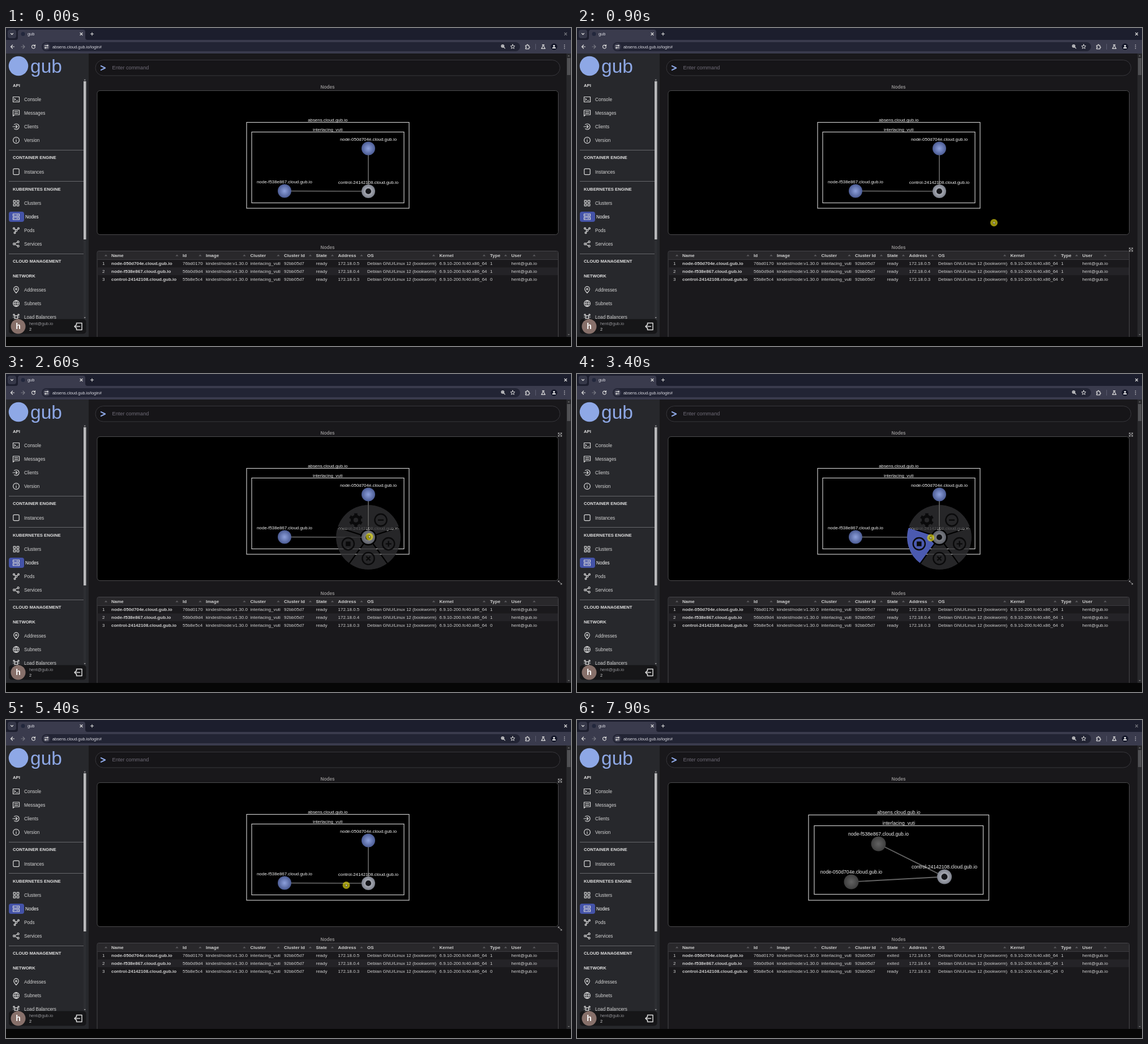
Recreate the animation shown at these times as an HTML page. Size 998 px wide and 561 px high, loop 8000 ms.

```html
<!DOCTYPE html>
<html lang="en">
<head>
<meta charset="utf-8">
<title>Nodes</title>
<style>
  html, body { margin: 0; width: 100%; height: 100%; overflow: hidden; background: #0b0b0b; }
  svg { display: block; width: 998px; height: 561px; font-family: "Liberation Sans", Arial, sans-serif; }
  .line { fill: none; stroke: #dadada; stroke-width: 1.2; stroke-linecap: round; stroke-linejoin: round; }
</style>
</head>
<body>
<svg id="stage" viewBox="0 0 998 561">
  <defs>
    <radialGradient id="ready"><stop offset="0" stop-color="#8da0dc"/><stop offset="1" stop-color="#4c5c94"/></radialGradient>
    <radialGradient id="control"><stop offset="0" stop-color="#c6c8d0"/><stop offset="1" stop-color="#7c808b"/></radialGradient>
    <radialGradient id="exited"><stop offset="0" stop-color="#626262"/><stop offset="1" stop-color="#3e3e3e"/></radialGradient>
    <mask id="cutout" maskUnits="userSpaceOnUse" x="-60" y="-60" width="120" height="120">
      <circle r="57.3" fill="#fff"/>
      <g id="spokes" stroke="#000" stroke-width="2.2"></g>
      <circle r="14.5"/>
      <rect id="pointer" x="-6" y="-6" width="12" height="12"/>
    </mask>
  </defs>
  <g id="browser"></g>
  <g id="sidebar"></g>
  <g id="page"></g>
  <g id="graph"></g>
  <g id="menu" transform="translate(640 288)"></g>
  <g id="hints" class="line"></g>
  <g id="cursor">
    <circle r="6.5" fill="#e8de10" opacity=".66"/>
    <path d="M-1-2.2V2L0 1.1 1 2.8 1.7 2.4.9.8 2 .6Z" fill="#fff" stroke="#222" stroke-width=".5"/>
  </g>
</svg>
<script>
const LOOP = 8000;
const HOST = 'absens.cloud.gub.io';
const USER = 'hent@gub.io';
const CLUSTER = 'interlacing_vuti';
const nodeName = id => `${id}.cloud.gub.io`;
const WORKER_A = nodeName('node-050d704e');
const WORKER_B = nodeName('node-f538e867');
const CONTROL = nodeName('control-24142108');

const $ = id => document.getElementById(id);
const text = (x, y, s, fill = '#d0d0d0', size = 8, extra = '') =>
  `<text x="${x}" y="${y}" fill="${fill}" font-size="${size}" ${extra}>${s}</text>`;
const rect = (x, y, w, h, fill, r = 0, extra = '') =>
  `<rect x="${x}" y="${y}" width="${w}" height="${h}" rx="${r}" fill="${fill}" ${extra}/>`;
const circle = (x, y, r, fill, extra = '') =>
  `<circle cx="${x}" cy="${y}" r="${r}" fill="${fill}" ${extra}/>`;
const icon = (x, y, d, extra = '') =>
  `<path class="line" transform="translate(${x} ${y})" d="${d}" ${extra}/>`;
const ring = (x, y, r) => `M${x - r} ${y}a${r} ${r} 0 1 0 ${2 * r} 0a${r} ${r} 0 1 0 ${-2 * r} 0`;
const box = (x, y, w, h = w) => `M${x} ${y}h${w}v${h}h${-w}z`;
const BOLD = 'font-weight="700"';
const MIDDLE = 'text-anchor="middle"';

const CROSS = 'M-2-2 2 2M2-2-2 2';
const UP = 'M-2.6 1.4H2.6L0-1.6Z';

function drawBrowser() {
  const star = Array.from({ length: 10 }, (_, i) => {
    const r = i % 2 ? 1.8 : 4, a = (i * 36 - 90) * Math.PI / 180;
    return `${(r * Math.cos(a)).toFixed(2)} ${(r * Math.sin(a)).toFixed(2)}`;
  }).join('L');
  $('browser').innerHTML =
    rect(0, 0, 998, 45, '#1c1e2d') +
    rect(3, 3, 15, 15, '#363849', 4) + icon(10.5, 10.5, 'M-2-1 0 1 2-1') +
    `<path d="M17 21q4 0 4-4V7q0-4 4-4H136q4 0 4 4V17q0 4 4 4Z" fill="#3a3b4d"/>` +
    rect(0, 21, 998, 24, '#3a3b4d') +
    circle(30, 10.5, 3.5, '#22273c') + text(38, 13.3, 'gub', '#e3e3ea', 7.4) +
    icon(133, 10.5, CROSS) + icon(152, 10.5, 'M-2.5 0H2.5M0-2.5V2.5') +
    rect(63, 25, 845, 16, '#222434', 8) + circle(71.5, 33, 6.2, '#3a3b4d') +
    icon(11.5, 33, 'M3 0H-3M0-3-3 0 0 3') +
    icon(30, 33, 'M-3 0H3M0-3 3 0 0 3', 'opacity=".4"') +
    icon(48.5, 33, 'M2.4-1.8A3 3 0 1 0 3 .5M3-3.4V-1.2H.8') +
    icon(71.5, 33, `M-3-1.8H0M0 1.8H3${ring(1.9, -1.8, 1)}${ring(-1.9, 1.8, 1)}`) +
    text(82, 35.6, HOST + '/login#', '#dcdce4', 7.35) +
    icon(878, 32.5, ring(-.7, -.7, 2.3) + 'M1 1 3.3 3.3M-1.7-.7H.3M-.7-1.7V.3') +
    icon(895, 33, `M${star}Z`, 'style="stroke-width:1"') +
    icon(921, 33, 'M-3.2-2.2H-1q0-1.6 1-1.6t1 1.6H2.7V0q1.4 0 1.4 1T2.7 2V3.8H-3.2V2q1.4 0 1.4-1T-3.2 0Z') +
    rect(935, 28, 1, 10, '#5a5b70') +
    icon(949, 33, 'M-1.6-3.5H1.6M-.9-3.5V-.8L-3.2 3.4H3.2L.9-.8V-3.5') +
    circle(968, 33, 5.8, '#15182a') + circle(968, 31.5, 1.6, '#fff') +
    '<path d="M964.8 36q0-2.3 3.2-2.3t3.2 2.3Z" fill="#fff"/>' +
    [30, 33, 36].map(y => circle(986.5, y, .8, '#ddd')).join('') +
    icon(988.5, 10.5, CROSS, 'id="close"');
}

function drawSidebar() {
  const items = [
    [126, 'Console', box(-5.5, -4.5, 11, 9) + 'M-3.2-1.6-1.4 0-3.2 1.6M.2 2H3'],
    [150, 'Messages', 'M-5.5-5H5.5V3H-3L-5.5 5.3ZM-3-2.5H3M-3 .3H3'],
    [174, 'Clients', 'M-3.4-3.6A5 5 0 1 1-3.4 3.6M-6 0H2M-.5-2.5 2 0-.5 2.5'],
    [198, 'Version', ring(0, 0, 5.4) + 'M0-.5V2.6M0-2.6V-2.5'],
    [253.5, 'Instances', 'M-3.5-5.2h7q1.7 0 1.7 1.7v7q0 1.7-1.7 1.7h-7q-1.7 0-1.7-1.7v-7q0-1.7 1.7-1.7'],
    [309, 'Clusters', box(-4.8, -4.8, 3.6) + box(1.2, -4.8, 3.6) + box(-4.8, 1.2, 3.6) + box(1.2, 1.2, 3.6)],
    [333, 'Nodes', box(-5.5, -5, 11, 4) + box(-5.5, 1, 11, 4) + 'M-3.2-3H-3M1-3H3M-3.2 3H-3M1 3H3'],
    [357, 'Pods', ring(0, 0, 1.7) + ring(-4, -3.5, 1.4) + ring(4, -3.5, 1.4) + ring(-2.5, 4.3, 1.4) + 'M-1.3-1.1-2.9-2.5M1.3-1.1 2.9-2.5M-.8 1.5-1.8 3'],
    [381, 'Services', ring(-3.8, 0, 1.6) + ring(3.6, -3.7, 1.6) + ring(3.6, 3.7, 1.6) + 'M-2.3-.7 2-3M-2.3.7 2 3'],
    [462, 'Addresses', 'M0 5.5Q-4.3 1-4.3-1.5A4.3 4.3 0 0 1 4.3-1.5Q4.3 1 0 5.5' + ring(0, -1.4, 1.3)],
    [486, 'Subnets', ring(0, 0, 5.3) + 'M-5.3 0H5.3M0-5.3Q-4.5 0 0 5.3Q4.5 0 0-5.3'],
    [510, 'Load Balancers', ring(0, 0, 2.6) + ring(-4, -4, 1.2) + ring(4, -4, 1.2) + 'M-3-3-2-2M3-3 2-2M-2.6 0H-5.5M2.6 0H5.5M-2 2-4 4M2 2 4 4'],
  ];
  const headings = [[101, 'API'], [228.5, 'CONTAINER ENGINE'], [284, 'KUBERNETES ENGINE'], [411, 'CLOUD MANAGEMENT'], [437, 'NETWORK']];
  $('sidebar').innerHTML =
    rect(0, 45, 146.5, 500, '#27282c') +
    circle(22, 67, 17.3, '#8ea8e6') + text(43, 78.5, 'gub', '#8ea8e6', 33.5) +
    headings.map(([y, s]) => text(12, y + 2.8, s, '#e2e2e2', 7.7, BOLD)).join('') +
    [215.5, 270.5, 398.5].map(y => rect(5, y - .5, 132, 1, '#66676b')).join('') +
    rect(5, 324, 27, 18, '#4453a8', 4) +
    items.map(([y, s, d]) => icon(18, y, d) +
      text(s === 'Nodes' ? 34 : 32, y + 3, s, s === 'Nodes' ? '#fff' : '#d4d4d4', 8.2)).join('') +
    rect(137, 89, 4.5, 426, '#2d2e32') + rect(137, 94, 4.5, 279, '#b9b9bb') +
    `<path transform="translate(139.2 91.5) scale(.6)" d="${UP}" fill="#bbb"/>` +
    `<path transform="translate(139.2 511) scale(.6 -.6)" d="${UP}" fill="#bbb"/>` +
    rect(5, 513.5, 136.5, 26, '#161618', 5) + circle(21.5, 526.5, 13, '#87706a') +
    text(21.5, 531, 'h', '#fff', 14, BOLD + MIDDLE) +
    text(41, 524.3, USER, '#96969a', 7.4) + text(41, 534.3, '2', '#d8d8d8', 7.4) +
    icon(127.5, 526.5, 'M-3-2.5V-6H6.5V6H-3V2.5M3 0H-6.5M-4-2.5-6.5 0-4 2.5', 'style="stroke-width:1.5"');
}

function drawPage() {
  const columns = [[186, 'Name'], [312, 'Id'], [353, 'Image'], [431.5, 'Cluster'], [491, 'Cluster Id'], [547.5, 'State'],
    [586.5, 'Address'], [638, 'OS'], [765.5, 'Kernel'], [855, 'Type'], [892.5, 'User']];
  const sorters = [176.5, 302, 343, 421, 481, 537.5, 576.5, 628, 755.5, 844.5, 882.5, 933];
  const rows = [[WORKER_A, '76bd0170', 5, 1], [WORKER_B, '56b0d9d4', 4, 1], [CONTROL, '55b8e5c4', 3, 0]];
  const tableRow = ([name, id, ip, type], i) => {
    const y = 418.2 + i * 13.8;
    const cells = [name, id, 'kindest/node:v1.30.0', CLUSTER, '92bb05d7', 'ready', '172.18.0.' + ip,
      'Debian GNU/Linux 12 (bookworm)', '6.9.10-200.fc40.x86_64', type, USER];
    return text(170, y, i + 1) + cells.map((s, c) =>
      text(columns[c][0], y, s, '#d0d0d0', 8, c === 0 ? BOLD : c === 5 ? `id="state${i}"` : '')).join('');
  };
  $('page').innerHTML =
    rect(146.5, 45, 851.5, 500, '#19181b') +
    rect(158, 56.5, 820.5, 27.5, '#161518', 13.7, 'stroke="#37363b"') +
    icon(171.5, 70.5, 'M-3.7-3.6 3.7 0-3.7 3.6', 'style="stroke:#8ea8e6;stroke-width:2"') +
    text(187.5, 73.3, 'Enter command', '#706c78', 9.2) +
    text(568, 106.8, 'Nodes', '#8d8b8c', 8.2, BOLD + MIDDLE) +
    rect(161, 110.5, 814.5, 254, '#000', 5, 'stroke="#4b4b4d"') +
    text(568, 390.4, 'Nodes', '#8d8b8c', 8.2, BOLD + MIDDLE) +
    `<path d="M161 545V396.500q0-3 3-3H972.500q3 0 3 3V545" fill="#1a191c" stroke="#47464a"/>` +
    rect(161.5, 394, 813.5, 14.5, '#29282b', 3) + rect(161.5, 408, 813.5, 1, '#3c3b3f') +
    rect(161.5, 422.3, 813.5, 13.8, '#242327') +
    columns.map(([x, s]) => text(x, 403.6, s, '#cfcfcf', 8, BOLD)).join('') +
    sorters.map(x => `<path transform="translate(${x} 401)" d="${UP}" fill="#5d5c60"/>`).join('') +
    rows.map(tableRow).join('') +
    rect(990, 45, 8, 500, '#29292c') + rect(991, 53, 6, 30, '#505053') +
    `<path transform="translate(994 49) scale(.7)" d="${UP}" fill="#777"/>` +
    `<path transform="translate(994 541) scale(.7 -.7)" d="${UP}" fill="#777"/>` +
    rect(0, 545, 998, 16, '#060606');
}

const before = {
  r: 12, font: 7.92, lift: 13.3,
  frames: [[425, 166.5, 287, 151.5, HOST], [434, 183.5, 269, 125, CLUSTER]],
  control: [640, 288], a: [640, 212.5], b: [492, 287.5],
};
const after = {
  r: 13, font: 8.64, lift: 15,
  frames: [[409, 167.5, 318.5, 150.5, HOST], [419, 186.5, 298.5, 121, CLUSTER]],
  control: [649, 276.5], a: [484.5, 285.5], b: [532.5, 218.5],
};

function drawGraph(layout, aState, bState, pressed) {
  const { r, font, lift, frames, control, a, b } = layout;
  const edge = ([x, y]) => `<path d="M${x} ${y}L${control}" stroke="#646464" stroke-width="${r / 7}"/>`;
  const label = (x, y, s) => text(x, y, s, '#f2f2f2', font, MIDDLE);
  const nodes = [[a, aState, WORKER_A], [b, bState, WORKER_B], [control, 'control', CONTROL]];
  return frames.map(([x, y, w, h, s]) =>
      rect(x, y, w, h, 'none', 0, 'stroke="#c9c9c9" stroke-width="1.2"') + label(568.3, y - 1.9, s)).join('') +
    edge(a) + edge(b) +
    nodes.map(([[x, y], fill]) => circle(x, y, r, `url(#${fill})`)).join('') +
    circle(...control, r * .42, '#15161a') +
    (pressed ? rect(control[0] - 20, control[1] - 20, 40, 40, '#000', 6, 'opacity=".25"') : '') +
    nodes.map(([[x, y], , s]) => label(x, y - lift, s)).join('');
}

function drawMenu() {
  const polar = (deg, r) => [r * Math.cos(deg * Math.PI / 180), r * Math.sin(deg * Math.PI / 180)].map(v => +v.toFixed(2));
  const signs = ['M-5 0H5M0-5V5', 'M-3.5-3.5 3.5 3.5M3.5-3.5-3.5 3.5', 'M-3-3H3V3H-3Z', '', 'M-5 0H5'];
  $('spokes').innerHTML = [54, 126, 198, 270, 342].map(d => `<path d="M0 0L${polar(d, 58)}"/>`).join('');
  const gear = circle(0, 0, 6.6, 'none', 'stroke-width="5"') +
    [0, 60, 120].map(d => `<path transform="rotate(${d + 30})" stroke-width="5.5" stroke-linecap="butt" d="M-12 0H-7M7 0H12"/>`).join('');
  $('menu').innerHTML =
    '<g mask="url(#cutout)">' + circle(0, 0, 57, '#303032', 'opacity=".8"') +
    `<path id="wedge" d="M0 0L${polar(126, 57)}A57 57 0 0 1 ${polar(198, 57)}Z" fill="#4b5ab0"/></g>` +
    signs.map((d, i) => {
      const shape = d ? circle(0, 0, 10.6, 'none') + `<path d="${d}" ${i === 2 ? 'fill="#0a0a0b"' : ''}/>` : gear;
      return `<g transform="translate(${polar(18 + i * 72, 37.5)})" fill="none" stroke="#0a0a0b" stroke-width="2.4">${shape}</g>`;
    }).join('');
}

function drawHints(t) {
  const expand = y => icon(978.5, y, 'M-3-3 3 3M3-3-3 3M-3-1V-3H-1M1-3H3V-1M3 1V3H1M-1 3H-3V1', 'style="stroke:#a5a5a5;stroke-width:1"');
  if (t < 100 || t >= 6400) return '';
  return t < 1000 ? expand(391)
    : expand(107) + icon(978.5, 368, 'M-3-3 3 3M-3-1.300V-3H-1.300M3 1.300V3H1.300', 'style="stroke:#a5a5a5;stroke-width:1"');
}

// Cursor moves: start time, end time, from, to
const moves = [
  [0, 900, [862, 540], [736.5, 343.5]],
  [900, 1600, [736.5, 343.5], [642, 287]],
  [3000, 3900, [642, 287], [601, 291.5]],
];
function cursorAt(t) {
  const [start, end, from, to] = moves.filter(m => t >= m[0]).pop();
  const p = Math.min(1, (t - start) / (end - start));
  const k = p * p * (3 - 2 * p);
  return from.map((v, i) => v + (to[i] - v) * k);
}

let shown = -1;
function render(ms) {
  const t = Math.floor(ms % LOOP / 100) * 100;
  if (t === shown) return;
  shown = t;

  const inside = t >= 100 && t < 6400;
  const [x, y] = cursorAt(t);
  $('cursor').setAttribute('transform', `translate(${x} ${y})`);
  $('cursor').style.display = inside ? '' : 'none';
  $('close').style.opacity = inside ? 1 : .45;
  $('hints').innerHTML = drawHints(t);

  const aState = t >= 7100 ? 'exited' : 'ready';
  const bState = t >= 7700 ? 'exited' : 'ready';
  $('state0').textContent = aState;
  $('state1').textContent = bState;
  $('graph').innerHTML = drawGraph(t >= 7700 ? after : before, aState, bState, t >= 2100 && t < 4900);

  const dx = x - 640, dy = y - 288, distance = Math.hypot(dx, dy);
  const aiming = distance > 14.5;
  $('menu').style.display = t >= 2600 && t < 4900 ? '' : 'none';
  $('wedge').style.display = $('pointer').style.display = aiming ? '' : 'none';
  $('pointer').setAttribute('transform', `rotate(${Math.atan2(dy, dx) * 180 / Math.PI}) translate(11.5) rotate(45)`);
}

drawBrowser();
drawSidebar();
drawPage();
drawMenu();
const began = performance.now();
function tick() {
  render(performance.now() - began);
  requestAnimationFrame(tick);
}
tick();
</script>
</body>
</html>
```
